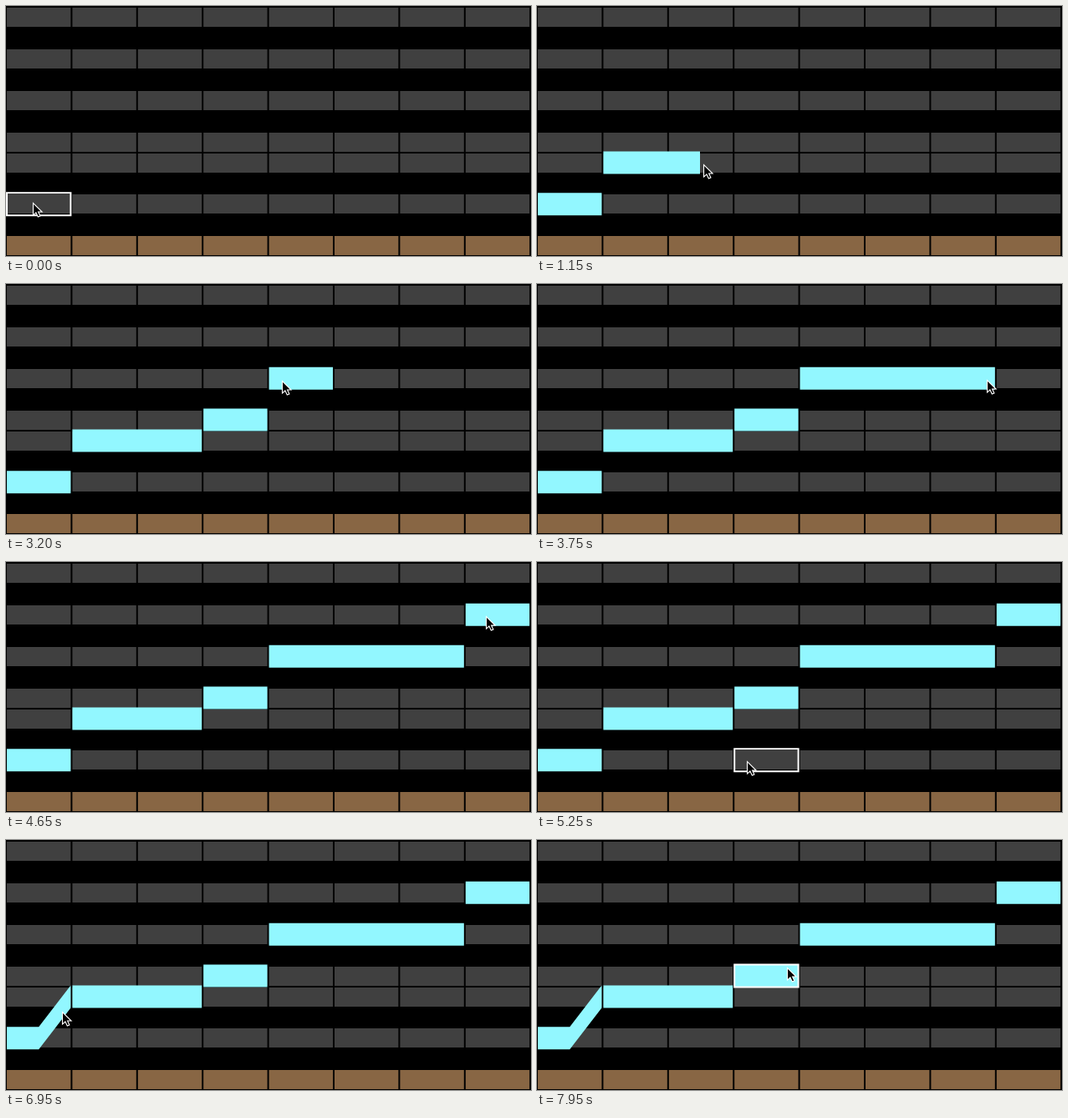
Animation, 628 px wide and 300 px high, one loop 8 s. Source, as an HTML page with a canvas:

```html
<!DOCTYPE html>
<html lang="en">
<head>
<meta charset="utf-8">
<title>Drawing notes in a piano roll</title>
<style>
  html, body { margin: 0; width: 100%; height: 100%; overflow: hidden; background: #000; }
  canvas { display: block; }
</style>
</head>
<body>
<canvas id="roll" width="628" height="300"></canvas>
<script>
const ctx = document.getElementById("roll").getContext("2d");
const LOOP = 8000, STEP = 50;
const COLS = 8, CELL = 78.4, ROW = 24.93, NOTE_HEIGHT = ROW + 2;
const SCALE_ROWS = [0, 2, 4, 6, 7, 9, 11];
const TONIC_ROW = 11;
const DRAG_SHARE = 0.6; // part of a hold spent moving
const ARROW = new Path2D("M0 0V14.6L3.4 11.5L5.8 16.6L8.4 15.4L6.1 10.5H10.6Z");

const at = (x, y) => ({ x, y });

// The pointer glides from each gesture's end to the next one's start
const gestures = [
  { action: "draw", press: 150, release: 300, from: at(32, 237) },
  { action: "draw", press: 840, release: 1600, from: at(94, 190), to: at(232, 191) },
  { action: "draw", press: 2100, release: 2500, from: at(255, 168), to: at(297, 170) },
  { action: "draw", press: 3150, release: 4050, from: at(325, 117), to: at(538, 116) },
  { action: "draw", press: 4600, release: 4750, from: at(574, 66) },
  { action: "hover", press: 5250, release: 5300, from: at(251, 240) },
  { action: "bend", press: 6000, release: 7000, from: at(42, 238), to: at(67, 207) },
  { action: "hover", press: 7950, release: LOOP, from: at(299, 154) }
];

function glide(a, b, progress) {
  const u = Math.max(0, Math.min(1, progress));
  const ease = u * u * (3 - 2 * u);
  return at(a.x + (b.x - a.x) * ease, a.y + (b.y - a.y) * ease);
}

function pointerAt(t) {
  const next = gestures.findIndex(g => t < g.press);
  const current = gestures.at(next < 0 ? -1 : Math.max(0, next - 1));
  const { press, release, from, to = from } = current;
  if (t <= release) return glide(from, to, (t - press) / (release - press) / DRAG_SHARE);
  const target = gestures[next];
  return glide(to, target.from, (t - release) / (target.press - release));
}

function snapRow(y) {
  const distance = row => Math.abs(y - (row + 0.5) * ROW);
  return SCALE_ROWS.reduce((best, row) => distance(row) < distance(best) ? row : best);
}

function findNote(notes, { x, y }) {
  const beat = x / CELL, row = snapRow(y);
  return notes.find(n => beat >= n.start && beat < n.start + n.length &&
    (n.row === row || n.bendRow === row));
}

function notesAt(t) {
  const notes = [];
  let length = 1;
  for (const { action, press, release, from } of gestures) {
    if (t < press) break;
    const tip = pointerAt(Math.min(t, release));
    if (action === "draw") {
      const start = Math.floor(from.x / CELL);
      const dragged = tip.x - from.x > 10;
      length = dragged
        ? Math.max(0.5, Math.round(2 * tip.x / CELL) / 2 - start)
        : Math.min(length, COLS - start);
      notes.push({ start, length, row: snapRow(from.y) });
    } else if (action === "bend") {
      const note = findNote(notes, from);
      note.knee = Math.round(2 * from.x / CELL) / 2;
      note.bendRow = snapRow(tip.y);
    }
  }
  return notes;
}

function previewNote(notes, { x, y }) {
  const start = Math.floor(x / CELL);
  const length = notes.length ? notes.at(-1).length : 1;
  return { start, row: snapRow(y), length: Math.min(length, COLS - start) };
}

function traceNote({ row, start, length, knee = start, bendRow = row }) {
  const left = start * CELL + 1, right = (start + length) * CELL - 1;
  const bendX = Math.max(left, knee * CELL);
  const top = row * ROW, endTop = bendRow * ROW;
  ctx.beginPath();
  ctx.moveTo(left, top);
  ctx.lineTo(bendX, top);
  ctx.lineTo(right, endTop);
  ctx.lineTo(right, endTop + NOTE_HEIGHT);
  ctx.lineTo(bendX, top + NOTE_HEIGHT);
  ctx.lineTo(left, top + NOTE_HEIGHT);
  ctx.closePath();
}

function drawGrid() {
  ctx.fillStyle = "#000";
  ctx.fillRect(0, 0, 628, 300);
  for (const row of SCALE_ROWS) {
    ctx.fillStyle = row === TONIC_ROW ? "#886644" : "#404040";
    for (let col = 0; col < COLS; col++) {
      ctx.fillRect(col * CELL + 1, Math.round(row * ROW) + 2, CELL - 2, 23);
    }
  }
}

function drawPointer({ x, y }) {
  ctx.save();
  ctx.translate(Math.round(x) + 0.5, Math.round(y) - 0.5);
  ctx.fillStyle = "#000";
  ctx.strokeStyle = "#fff";
  ctx.lineWidth = 1.1;
  ctx.fill(ARROW);
  ctx.stroke(ARROW);
  ctx.restore();
}

function draw(t) {
  const pointer = pointerAt(t), notes = notesAt(t);
  const pressed = gestures.some(g => g.action !== "hover" && t >= g.press && t < g.release);
  drawGrid();
  ctx.fillStyle = "#92f7ff";
  for (const note of notes) {
    traceNote(note);
    ctx.fill();
  }
  if (!pressed) {
    traceNote(findNote(notes, pointer) || previewNote(notes, pointer));
    ctx.strokeStyle = "#fff";
    ctx.lineWidth = 2;
    ctx.stroke();
  }
  drawPointer(pointer);
}

function frame() {
  draw(Math.floor(performance.now() % LOOP / STEP) * STEP);
  requestAnimationFrame(frame);
}
frame();
</script>
</body>
</html>
```
